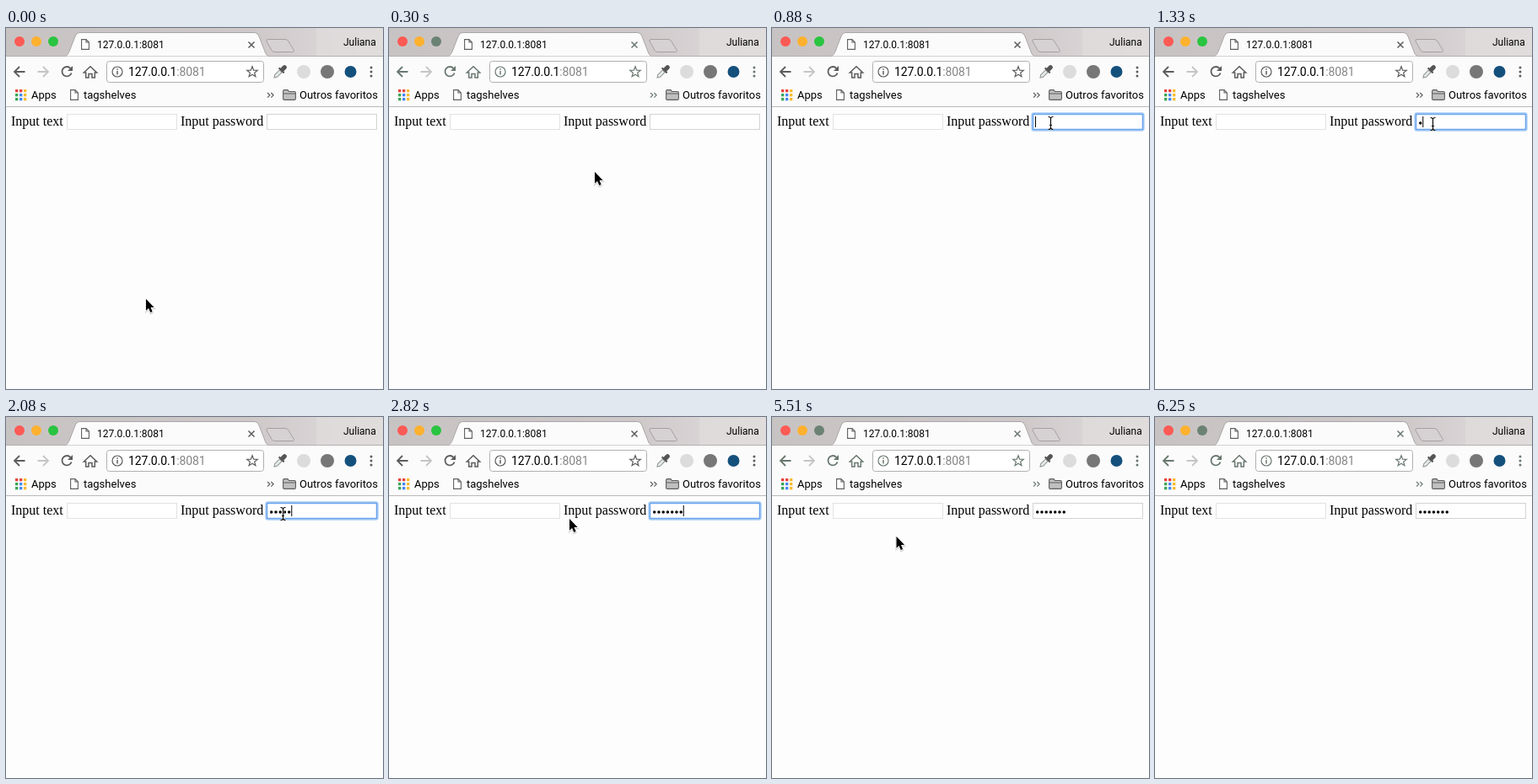
An HTML page that plays this animation: 447x429 px, repeating every 6700 ms.

```html
<!DOCTYPE html>
<html lang="pt">
<head>
<meta charset="utf-8">
<title>Input demo</title>
<style>
  html, body { margin: 0; width: 100%; height: 100%; overflow: hidden; background: #fdfdfd; }
  svg { display: block; width: 447px; height: 429px; --go: #29c440; --ink: #5c5c5c; }
  svg.muted { --go: #6b8273; --ink: #68786f; }
  .ui { font: 13px Roboto, "Open Sans", sans-serif; fill: #000; }
  .small { font-size: 12px; }
  .url { font-size: 14px; letter-spacing: -.12px; }
  .page { font: 16px "Liberation Serif", serif; fill: #000; }
  .line { fill: none; stroke: var(--ink); stroke-width: 1.8; }
  .thin { fill: none; stroke: var(--ink); stroke-width: 1.2; }
</style>
</head>
<body>
<svg id="stage" viewBox="0 0 447 429">
  <defs>
    <linearGradient id="strip">
      <stop offset="0" stop-color="#c8c3c3"/>
      <stop offset=".65" stop-color="#cec8c9"/>
      <stop offset=".83" stop-color="#d8d3d4"/>
      <stop offset="1" stop-color="#e2dddd"/>
    </linearGradient>
    <path id="doc" d="M.6 .6H6L9.4 4V12.4H.6ZM6 .6V4H9.4" fill="#fff" stroke="#606060" stroke-width="1.1"/>
    <path id="ibeam" d="M-3 -7.500Q0 -7.500 0 -5.500Q0 -7.500 3 -7.500M0 -5.500V5.500M-3 7.500Q0 7.500 0 5.500Q0 7.500 3 7.500M-1.500 2.500H1.500"/>
    <path id="tip" d="M0 0V13.800L3.100 10.900L5.300 16L7.600 15L5.500 10H9.600Z"/>
  </defs>

  <rect width="447" height="429" fill="#fdfdfd"/>

  <!-- tab strip -->
  <rect width="447" height="34" fill="url(#strip)"/>
  <path d="M368 0H447V34H368Z" fill="#e2dddd" opacity=".7"/>
  <rect y="33" width="447" height="1" fill="#b3afaf"/>
  <circle cx="16" cy="16" r="6" fill="#fc5a55"/>
  <circle cx="36" cy="16" r="6" fill="#fdb12f"/>
  <circle cx="56" cy="16" r="6" fill="var(--go)"/>
  <path d="M69 34C73 33 74 30 75 28L82 10Q83.500 5.500 87 5.500H295Q298.500 5.500 300 10L307 28C308 31 309 33 313 34Z" fill="#fcfbfc" stroke="#aaa6a6"/>
  <path d="M311 13.500H331Q334 13.500 335 16L341 26Q342.500 28.500 339.500 28.500H319Q316 28.500 315 26.500L309 16Q308 13.500 311 13.500Z" fill="#d6d1d2" stroke="#a5a0a1"/>
  <use href="#doc" x="89" y="13"/>
  <text class="ui small" x="108" y="24">127.0.0.1:8081</text>
  <path d="M287.500 16.500L294.500 23.500M294.500 16.500L287.500 23.500" class="line" style="stroke-width:1.5"/>
  <text class="ui small" x="400" y="21">Juliana</text>

  <!-- toolbar -->
  <rect y="34" width="447" height="59" fill="#fcfbfc"/>
  <rect y="93" width="447" height="1" fill="#bbb8b9"/>
  <path d="M22.500 52H10.500M16 46L10 52L16 58" class="line"/>
  <path d="M37.500 52H49.500M44 46L50 52L44 58" class="line" style="stroke:#c6c5c6"/>
  <path d="M76.500 48A5.700 5.700 0 1 0 77.600 53.500" class="line"/>
  <path d="M79 45V51H73Z" fill="var(--ink)"/>
  <path d="M92.300 53L100 45.800L107.700 53H105.300V59H102V54.500H98V59H94.700V53Z" class="thin" style="stroke-width:1.500"/>
  <rect x="119.500" y="39.500" width="186" height="25" rx="3" fill="#fff" stroke="#b1b0b1"/>
  <circle cx="132" cy="52" r="6" class="thin"/>
  <path d="M132 51V55.500M132 48.300V49.800" class="line" style="stroke-width:1.500"/>
  <text class="ui url" x="145" y="57">127.0.0.1<tspan fill="#858585">:8081</tspan></text>
  <path id="star" class="thin"/>
  <g transform="translate(325 52) rotate(45)">
    <path d="M-1.900 -1H1.900V7L0 10L-1.900 7Z" fill="#e4eaea" stroke="#929696"/>
    <rect x="-2.600" y="-10" width="5.200" height="8" rx="2.400" fill="#555"/>
    <rect x="-4.300" y="-3.500" width="8.600" height="2.300" rx=".6" fill="#555"/>
  </g>
  <circle cx="353" cy="52" r="8" fill="#dcdcdc"/>
  <circle cx="381" cy="52" r="8" fill="#777"/>
  <circle cx="408.500" cy="52" r="7" fill="#14507c"/>
  <g id="menu" fill="var(--ink)"></g>

  <!-- bookmarks -->
  <g id="apps"></g>
  <text class="ui" x="30" y="84">Apps</text>
  <use href="#doc" x="76" y="73"/>
  <text class="ui" x="92" y="84">tagshelves</text>
  <path d="M310 77L312.800 79.800L310 82.600M314.300 77L317.100 79.800L314.300 82.600" class="thin"/>
  <path d="M328.600 84.500V75Q328.600 73.600 330 73.600H334L335.500 75.500H342Q343.400 75.500 343.400 77V84Q343.400 85.400 342 85.400H330Q328.600 85.400 328.600 84.500ZM328.600 78H343.400" fill="#c0c0c0" stroke="#5d5d5d" stroke-width="1.100"/>
  <text class="ui" x="348" y="84">Outros favoritos</text>

  <!-- form -->
  <text class="page" x="6" y="116">Input text</text>
  <text class="page" x="207" y="116">Input password</text>
  <rect x="72.500" y="102.500" width="130" height="18" fill="#fff" stroke="#e2e2e2"/>
  <rect x="309.500" y="102.500" width="130" height="18" fill="#fff" stroke="#d3d3d3"/>
  <g id="ring" fill="none">
    <rect x="308.500" y="101.500" width="132" height="20" rx="2" stroke="#a9cdf8" stroke-width="2.400"/>
    <rect x="309.500" y="102.500" width="130" height="18" rx=".5" stroke="#6ba5ea" stroke-width="1.500"/>
  </g>
  <g id="dots"></g>
  <rect id="caret" y="105" width="1" height="13"/>

  <!-- pointers -->
  <g id="arrow">
    <use href="#tip" y="1.200" stroke="#000" stroke-width="2" opacity=".18"/>
    <use href="#tip" fill="#000" stroke="#fff" stroke-width="1.400" paint-order="stroke"/>
  </g>
  <g id="beam" fill="none">
    <use href="#ibeam" stroke="#fff" stroke-width="2"/>
    <use href="#ibeam" stroke="#000" stroke-width="1.100"/>
  </g>
</svg>
<script>
const LOOP = 6700;
const FOCUS = 880, BLUR = 3120;
const KEYS = [1330, 1480, 1780, 1930, 2080, 2380, 2530];
// time, x, y of the pointer; it jumps from one place to the next
const PATH = [
  [0, 166, 322], [150, 183, 289], [300, 244, 171], [450, 322, 135], [590, 329, 126],
  [740, 330.5, 113], [1330, 329.5, 114], [2080, 328.5, 115],
  [2530, 324, 121], [2670, 290, 128], [2820, 214, 121], [2970, 165, 119], [3120, 150, 118],
  [5510, 147.5, 142], [5660, 155, 224], [5810, 255, 337], [5960, 370, 407], [6100, 383, 420]
];
const EXIT = 6250, BEAM_ON = 740, BEAM_OFF = 2530;
const PITCH = 5.25;

const get = id => document.getElementById(id);
const stage = get('stage');

function add(parent, tag, attrs) {
  const node = document.createElementNS('http://www.w3.org/2000/svg', tag);
  for (const key in attrs) node.setAttribute(key, attrs[key]);
  return get(parent).appendChild(node);
}

const show = (node, on) => node.setAttribute('visibility', on ? 'visible' : 'hidden');

const starPoints = Array.from({ length: 10 }, (_, i) => {
  const r = i % 2 ? 2.8 : 6.6, a = i * Math.PI / 5;
  return (292 + r * Math.sin(a)).toFixed(2) + ' ' + (52.4 - r * Math.cos(a)).toFixed(2);
});
get('star').setAttribute('d', 'M' + starPoints.join('L') + 'Z');

for (let i = 0; i < 3; i++) add('menu', 'circle', { cx: 433, cy: 47 + i * 5, r: 1.5 });

['#e8453c', '#e8453c', '#f9bb2d', '#3aa757', '#4688f1', '#f9bb2d', '#3aa757', '#4688f1', '#f9bb2d']
  .forEach((fill, i) => add('apps', 'rect', {
    x: 11 + i % 3 * 5, y: 73 + Math.floor(i / 3) * 5, width: 3.3, height: 3.3, fill
  }));

const dots = KEYS.map((_, i) => add('dots', 'circle', { cx: 314.7 + i * PITCH, cy: 113, r: 1.75 }));

function draw(t) {
  const focused = t >= FOCUS && t < BLUR;
  const typed = KEYS.filter(k => k <= t).length;
  const beam = t >= BEAM_ON && t < BEAM_OFF;
  const [, x, y] = PATH.filter(p => p[0] <= t).pop();

  stage.classList.toggle('muted', t >= 150 && !focused);
  show(get('ring'), focused);
  show(get('caret'), focused);
  get('caret').setAttribute('x', 312 + typed * PITCH);
  dots.forEach((dot, i) => show(dot, i < typed));

  show(get('arrow'), !beam && t < EXIT);
  show(get('beam'), beam);
  get(beam ? 'beam' : 'arrow').setAttribute('transform', `translate(${x} ${y})`);
}

const start = performance.now();
function tick() {
  draw((performance.now() - start) % LOOP);
  requestAnimationFrame(tick);
}
tick();
</script>
</body>
</html>
```
